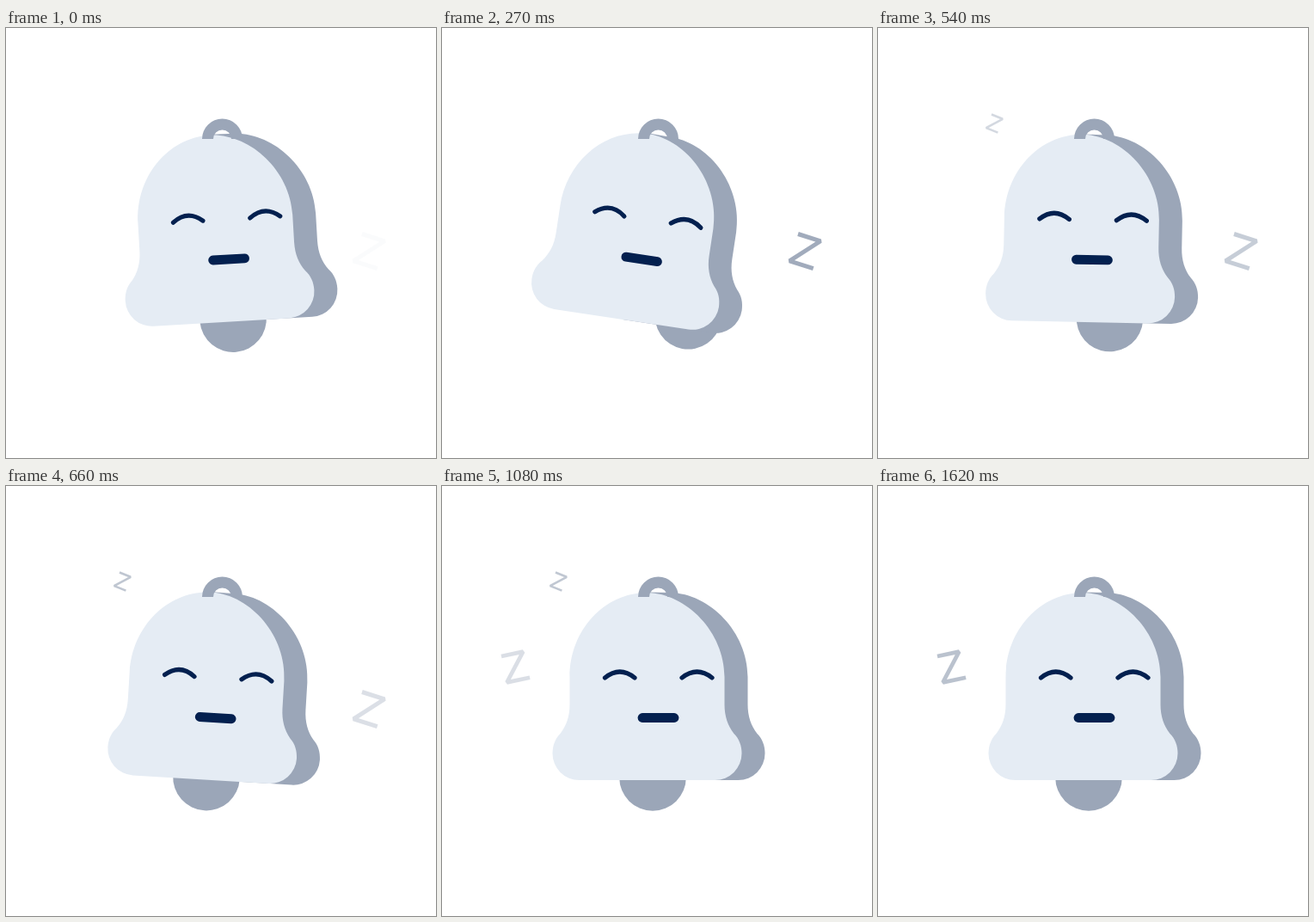
Animation of 500x500 px, one loop 1650 ms. Source, as an HTML page:

```html
<!DOCTYPE html>
<html lang="en">
<head>
<meta charset="utf-8">
<title>Sleeping bell</title>
<style>
  html, body { margin: 0; height: 100%; overflow: hidden; background: #fff; }
  svg { display: block; width: 100vw; height: 100vh; }
  .gray { fill: #9ba6b8; }
  .front { fill: #e5ecf4; }
  .face { fill: none; stroke: #03204f; stroke-width: 5.2; stroke-linecap: round; }
  .z { fill: none; stroke: #9ba6b8; stroke-width: 5; stroke-linejoin: bevel; }
</style>
</head>
<body>
<svg viewBox="0 0 500 500">
  <defs><path id="z" d="M0 0H27.5L0 33H29"/></defs>
  <g class="z">
    <use href="#z" transform="translate(414 239.5) rotate(17.5)"/>
    <use href="#z" transform="translate(132 100.5) rotate(22) scale(.51)"/>
    <use href="#z" transform="translate(69 198) rotate(-12) scale(.94)"/>
  </g>
  <circle id="clapper" class="gray" cx="245" cy="339" r="38.8"/>
  <g id="bell">
    <path class="gray" d="M240 123.5L265.5 124c46 1 90 46 90 98v32c0 14 4 25 11 34c6 6 9 14 9 23a31 31 0 0 1-31 31H240z"/>
    <path class="front" d="M238.5 124c46 1 90 46 90 98v32c0 14 4 25 11 34c6 6 9 14 9 23a31 31 0 0 1-31 31H159.5a31 31 0 0 1-31-31c0-9 3-17 9-23c7-9 11-20 11-34v-32c0-54 40-98 90-98z"/>
    <g class="face">
      <path d="M189.500 223q17.250-14 34.500 0m55 0q17.500-14 35 0"/>
      <path d="M233 269.500h37" stroke-width="10.800"/>
    </g>
  </g>
  <path class="gray" d="M228 129a23.500 23.500 0 0 1 47 0h-13a10.500 10.500 0 0 0-21 0z"/>
</svg>
<script>
  const LOOP = 1650, STEP = 30;
  const SWING_START = -60, SWING_END = 900;
  const bell = document.getElementById('bell');
  const clapper = document.getElementById('clapper');
  const zs = document.querySelectorAll('.z use');

  const clamp = u => Math.max(0, Math.min(1, u));
  const smooth = u => u * u * (3 - 2 * u);

  // Eases out to the first peak, then oscillates while dying away
  function swing(t, amplitude, peak, halfPeriod) {
    const rise = smooth(clamp((t - SWING_START) / (peak - SWING_START)));
    const decay = clamp(1 - t / SWING_END) ** 0.7;
    return -amplitude * rise * decay * Math.cos(Math.PI * Math.max(0, t - peak) / halfPeriod);
  }

  // Each letter peaks one fade after the one before it
  function fade(t, i) {
    const length = 575, peak = 290 + length * i;
    const rise = Math.min(length, peak + 15);
    return clamp(1 - (t < peak ? (peak - t) / rise : (t - peak) / length));
  }

  function rotate(el, angle) {
    el.setAttribute('transform', `rotate(${angle} 245.5 140)`);
  }

  function draw() {
    const t = Math.floor(performance.now() % LOOP / STEP) * STEP;
    const angle = swing(t, 20, 170, 146);
    rotate(bell, angle);
    rotate(clapper, angle + swing(t, 26.5, 285, 150));
    zs.forEach((z, i) => z.setAttribute('opacity', fade(t, i)));
    requestAnimationFrame(draw);
  }
  draw();
</script>
</body>
</html>
```
